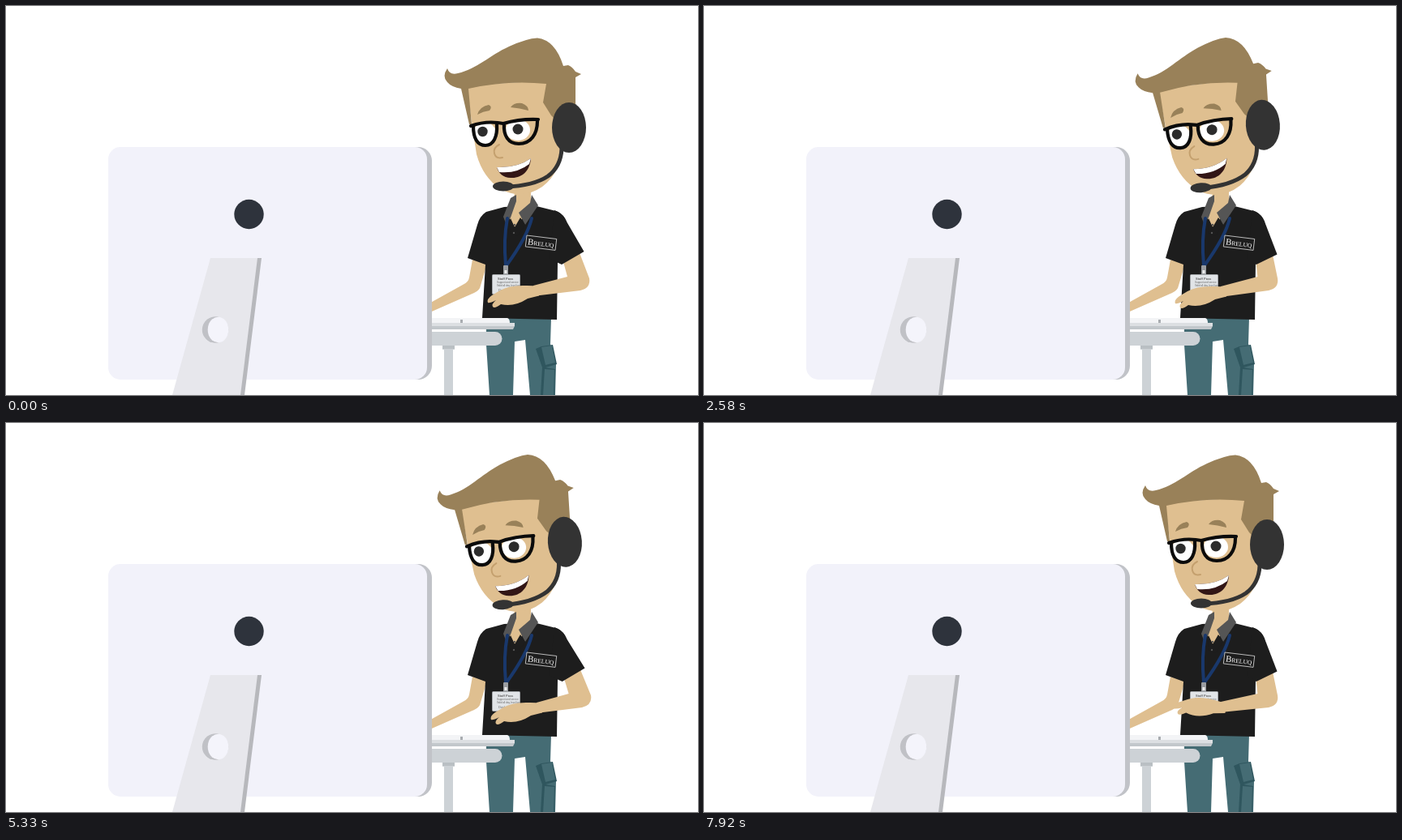
An HTML page for the animation above (8.01 s loop, 853 by 480 pixels).

```html
<!DOCTYPE html>
<html lang="en">
<head>
<meta charset="utf-8">
<title>Help desk</title>
<style>
  html, body { margin: 0; width: 100%; height: 100%; overflow: hidden; background: #fff; }
  svg { display: block; width: 100vw; height: 100vh; }
  .skin { fill: #dfbf90; }
  .hair { fill: #998159; }
  .shirt { fill: #1d1d1d; }
  .line { fill: none; stroke-linecap: round; stroke-linejoin: round; }
</style>
</head>
<body>
<svg viewBox="0 0 853 480">
  <!-- trousers -->
  <path fill="#456c74" d="M592 384H672L671 417 678 442 677 480H646L640 412 627 414 625 480H596L592 418Z"/>
  <path fill="#2f565e" d="M653 423L660 420 674 418 679 442 665 446 677 448 676 480H659L661 446Z"/>
  <path fill="#456c74" d="M660 421L673 419 677 440 665 443ZM664 448L676 449 675 480H662Z"/>

  <!-- left arm and torso -->
  <path class="skin" d="M575 313L571 335Q570 341 563 344L518 369V380L577 354Q584 351 585 345L593 318Z"/>
  <path class="shirt" d="M614 248L650 246 678 253Q687 256 691 266L694 290 680 316 679 387 587 385 591 319 569 311 581 270Q584 259 592 254Z"/>
  <path class="skin" d="M628 226H647V250L627 273 621 262Z"/>
  <path fill="#555" d="M629 233L622 237 613 260 616 268 622 261 629 241ZM648 233L656 246 640 270 632 255 646 243Z"/>
  <path class="shirt" d="M622 262L627 273 634 261 640 270 630 284 621 280Z"/>
  <circle cx="627" cy="270" r="1.2" fill="#555"/>
  <circle cx="626" cy="280" r="1.2" fill="#555"/>
  <path class="line" stroke="#19386c" stroke-width="4" d="M618 262Q613 288 616 320M648 262Q643 284 617 320"/>

  <!-- badge -->
  <rect x="613" y="320" width="6" height="13" rx="1" fill="#9a9da1"/>
  <rect x="614.5" y="326" width="3" height="4" fill="#eee"/>
  <rect x="599.5" y="331.5" width="34" height="24" rx="1" fill="#e1e4e7" stroke="#a4a7aa"/>
  <g font-family="'Liberation Sans', Arial, sans-serif" font-size="4" fill="#666">
    <text x="606" y="338" font-weight="bold">Staff Pass</text>
    <text x="605" y="342" font-size="3">Support and service</text>
    <text x="605" y="346" font-size="3">Valid all day, level two</text>
    <text x="607" y="352">Desk 2</text>
  </g>

  <!-- head -->
  <g id="head">
    <path class="skin" d="M568 98L575 150 580 183Q588 212 610 226 636 240 661 223 684 206 686 170L692 110 666 92Z"/>
    <path class="hair" d="M544 77Q547 86 557 83C580 78 596 61 620 50Q642 40 655 39.500Q677 42 687 74L693 73Q698 75 702 81L709 84 702 88V123L682 145 672 135 662 119 666 96Q618 91 570 102L574 146H571L561 102Q549 100 544 94 537 87 544 77Z"/>
    <path class="hair" d="M581 134Q584 124 595 122 600 124 596 129 588 130 581 134ZM622 125Q626 119 636 120 644 123 644 129 633 126 622 125Z"/>
    <ellipse cx="590" cy="157" rx="14" ry="13.500" fill="#fff"/>
    <ellipse cx="631" cy="153" rx="15" ry="13" fill="#fff"/>
    <circle cx="587.5" cy="155" r="6.200" fill="#2c2c2c"/>
    <circle cx="631" cy="152" r="6.500" fill="#2c2c2c"/>
    <g class="line" stroke="#0b0b0b" stroke-width="4.200">
      <path d="M576 148C576 163 581 172 591 172 601 172 606 161 605 146M614 145C613 160 619 170 632 170 647 170 655 158 655 142"/>
      <path d="M573 148Q590 142 606 144L613 145Q634 139 656 140"/>
    </g>
    <path class="line" stroke="#c4a06e" stroke-width="2" d="M608 171Q600 175 602 182 604 189 612 187"/>
    <path fill="#321616" d="M605 199Q630 200 647 188C646 203 636 213 622 212 613 212 607 206 605 199Z"/>
    <path fill="#fff" d="M605 199Q630 200 647 188L645 195Q630 207 608 205Z"/>
    <path class="line" stroke="#333" stroke-width="5" d="M685 176Q684 198 668 210 650 222 616 223"/>
    <ellipse cx="613" cy="222.5" rx="13" ry="6" fill="#333"/>
    <ellipse cx="694" cy="150" rx="21" ry="31" fill="#333"/>
  </g>

  <!-- right arm -->
  <path id="arm" class="skin"/>
  <path id="sleeve" class="shirt"/>
  <path id="hand" class="skin" d="M7 -5.500L-8 -6Q-29 -7 -41 0L-51 6Q-58 11 -56 15 -54 16 -46 12 -52 17 -50 20 -48 23 -40 17 -24 21 -7 10L7 6.500Z"/>
  <g transform="translate(642 283) rotate(7)">
    <rect width="37" height="14" fill="none" stroke="#d8d8d8" stroke-width=".8"/>
    <text x="2" y="11" font-family="'Liberation Serif', Times, serif" font-size="11" fill="#fff">B<tspan font-size="7.600">RELUQ</tspan></text>
  </g>

  <!-- desk -->
  <path fill="#cdd2d6" d="M538 418H553V424H551V480H540V424H538Z"/>
  <path fill="#b9bfc3" d="M538 419H553V423H538Z"/>
  <path fill="#cdd2d6" d="M520 402H603A8 8 0 0 1 603 419H520Z"/>
  <path fill="#f3f4f6" d="M520 385H618Q621 386 621 391H520Z"/>
  <rect x="560" y="387" width="3" height="4" fill="#a9adb1"/>
  <path fill="#dcdfe2" d="M520 391H627V395H520Z"/>
  <path fill="#c2c7cb" d="M520 395H627L625 399H520Z"/>

  <!-- monitor -->
  <rect x="300" y="174" width="225" height="287" rx="17" fill="#c1c3c8"/>
  <rect x="126" y="174" width="393" height="287" rx="15" fill="#f2f2fa"/>
  <circle cx="299.5" cy="257" r="18.200" fill="#2e333c"/>
  <path fill="#e7e7ec" d="M252 311H311L290 480H205Z"/>
  <path fill="#b7b8bc" d="M310 311H315L294 480H289Z"/>
  <circle cx="258" cy="399.5" r="16.200" fill="#c0c1c6"/>
  <ellipse cx="261.5" cy="399.5" rx="12.800" ry="15.800" fill="#f4f4fb"/>
</svg>
<script>
const LOOP = 8010, FRAMES = 96;
const head = document.getElementById('head');
const arm = document.getElementById('arm');
const sleeve = document.getElementById('sleeve');
const hand = document.getElementById('hand');

// Typing cycle: [tick, wrist x, wrist y, hand angle, elbow shift]
const CYCLE = 37.5;
const poses = [
  [0, 650, 351, 0, 0], [4, 654, 351, 0, 2], [11, 654, 351, 0, 2],
  [13.5, 650, 351, 0, 0], [15, 637, 350, 13, -12], [21, 637, 350, 13, -12],
  [23, 637, 352, 0, -12], [25.5, 654, 351, 0, 2], [29, 654, 351, 0, 2],
  [31, 637, 352, 0, -12], [34, 637, 352, 0, -12], [37.5, 650, 351, 0, 0]
];

function poseAt(tick) {
  const i = poses.findIndex(p => p[0] > tick);
  const a = poses[i - 1], b = poses[i];
  const k = (tick - a[0]) / (b[0] - a[0]);
  return a.map((v, j) => v + (b[j] - v) * k).slice(1);
}

function draw(now) {
  // The small lead covers frame delays being rounded to 10 ms
  const tick = Math.floor(now % LOOP / LOOP * FRAMES + .2) % FRAMES;
  const beat = tick % 12;
  head.setAttribute('transform', `rotate(${beat > 3 && beat < 8 ? -3.6 : 0} 640 230)`);

  const [x, y, angle, e] = poseAt(tick % CYCLE);
  const half = e / 2;
  hand.setAttribute('transform', `translate(${x} ${y}) rotate(${angle})`);
  arm.setAttribute('d', `M${686 + half} 312L${692 + e * .8} 334 ${x} ${y - 6}V${y + 7}
    L${708 + e} 351Q${721 + e} 348 ${719 + e} 336L${706 + half} 302Z`);
  sleeve.setAttribute('d', `M676 252Q687 256 691 266L${712.5 + half} ${303 - e * .3}
    ${685 + half * .7} 319 670 312Z`);
  requestAnimationFrame(draw);
}
requestAnimationFrame(draw);
</script>
</body>
</html>
```
